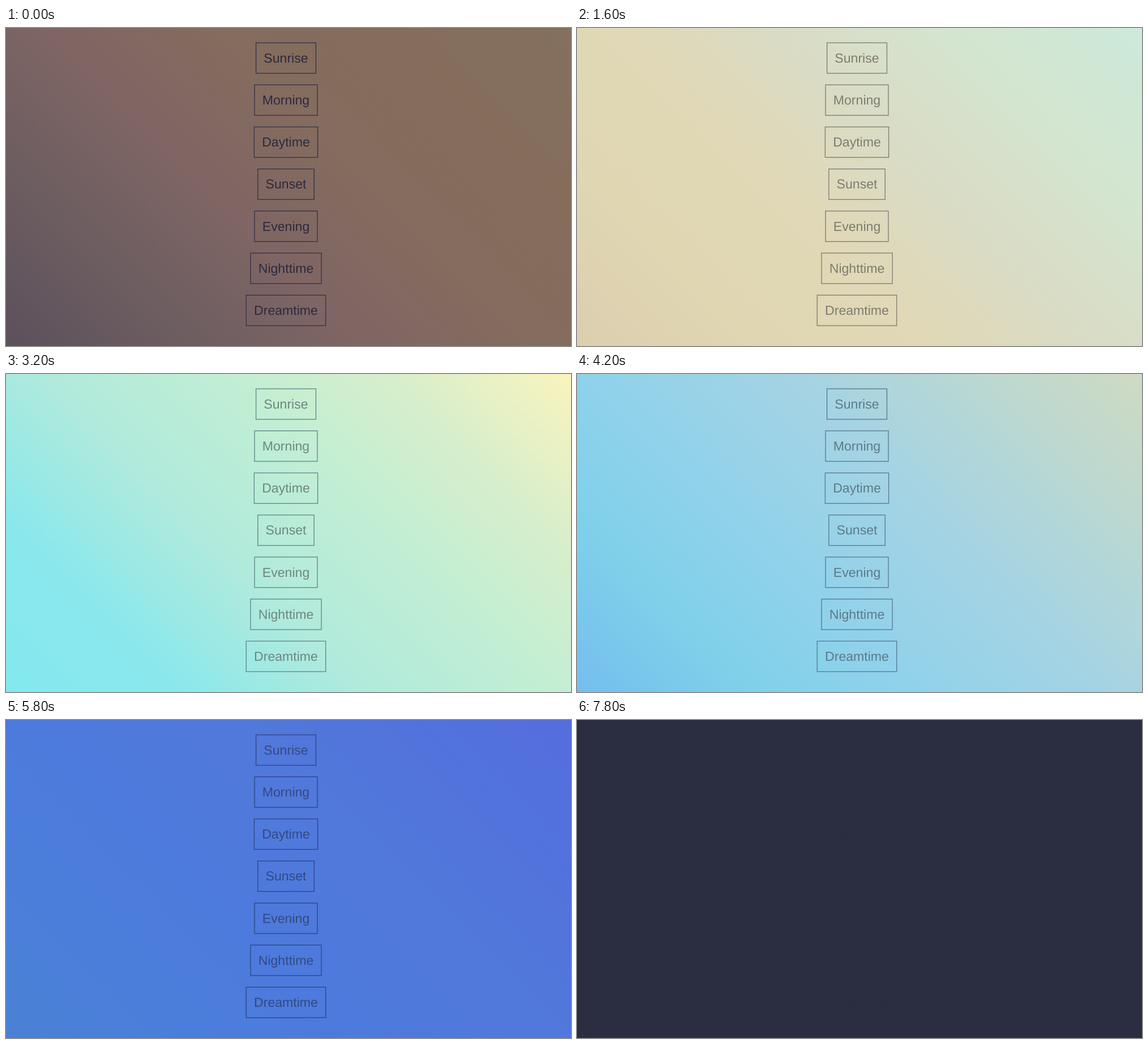
Write an HTML page that moves like this. It is 998 by 561 pixels and loops after 8 s.

```html
<!DOCTYPE html>
<html lang="en">
<head>
<meta charset="utf-8">
<title>Times of day</title>
<style>
  html, body { margin: 0; width: 100%; height: 100%; overflow: hidden; background: #2b2d40; }
  svg { display: block; width: 998px; height: 561px; }
  text { font: 23.1px "Liberation Sans", Arial, sans-serif; text-anchor: middle; text-rendering: geometricPrecision; }
  rect.box { fill: none; stroke-width: 1.3px; }
</style>
</head>
<body>
<svg viewBox="0 0 998 561">
  <defs>
    <linearGradient id="sky" gradientUnits="userSpaceOnUse" x1="109.25" y1="670.25" x2="888.75" y2="-109.25"></linearGradient>
  </defs>
  <rect width="998" height="561" fill="url(#sky)"/>
  <g id="menu"></g>
</svg>
<script>
const LABELS = ["Sunrise", "Morning", "Daytime", "Sunset", "Evening", "Nighttime", "Dreamtime"];
const LOOP = 8000, STEP = 200, MID = 494.5, ROW = 74.2;

// Each key: start of its hold, end of its hold, six sky stops, text colour, border colour
const KEYS = [
  [0, 800, "5c505c 6c5d60 7f6564 846c5e 856d5c 84705e", "2c2a3e", "343248"],
  [1600, 2400, "dcceb0 e0d6b2 e0d8b6 d9dcc6 d3e6d0 cce9da", "7d7c6e", "7c7a72"],
  [3200, 4000, "84e8f0 8ae8ec b0eadc c0eed4 d8eecb faf4bd", "6c8780", "608488"],
  [4200, 4200, "74beee 80d0ea 92d2ea a4d3e4 b9d8d2 d0dac2", "5c7a88", "587690"],
  [4800, 5600, "508ee8 508af4 5486f8 5b86f9 5c7efb 6178ff", "345496", "2e4c94"],
  [6400, 7200, "3d5a96 3a5991 37568b 33527f 32507b 315079", "272d44", "29324c"],
  [7800, 8000, "2b2d40 2b2d40 2b2d40 2b2d40 2b2d40 2b2d40", "2b2d40", "2b2d40"]
].map(([from, to, sky, text, border]) => ({
  from, to, colors: [...sky.split(" "), text, border].map(parse)
}));

function parse(hex) {
  return [0, 2, 4].map(i => parseInt(hex.slice(i, i + 2), 16));
}

function add(parent, name, attrs) {
  const el = document.createElementNS("http://www.w3.org/2000/svg", name);
  for (const key in attrs) el.setAttribute(key, attrs[key]);
  return parent.appendChild(el);
}

const menu = document.getElementById("menu");
const sky = document.getElementById("sky");
const stops = [0, 1, 2, 3, 4, 5].map(i => add(sky, "stop", { offset: i / 5 }));

const boxes = LABELS.map((label, i) => {
  const y = 26.1 + i * ROW;
  const text = add(menu, "text", { x: MID, y: y + 34.6 });
  text.textContent = label;
  const width = text.getComputedTextLength() + 27.5;
  return add(menu, "rect", { class: "box", x: MID - width / 2, y, width, height: 53.8 });
});

function colorsAt(time) {
  let i = KEYS.length - 1;
  while (KEYS[i].from > time) i--;
  const a = KEYS[i], b = KEYS[i + 1];
  const k = b && time > a.to ? (time - a.to) / (b.from - a.to) : 0;
  return a.colors.map((color, n) => {
    const mixed = color.map((v, c) => k ? v + (b.colors[n][c] - v) * k : v);
    return `rgb(${mixed.map(Math.round)})`;
  });
}

function draw(now) {
  // The light changes in visible steps
  const time = Math.floor((now % LOOP) / STEP) * STEP;
  const colors = colorsAt(time);
  stops.forEach((stop, i) => stop.setAttribute("stop-color", colors[i]));
  menu.setAttribute("fill", colors[6]);
  boxes.forEach(box => box.setAttribute("stroke", colors[7]));
}

const start = performance.now();
function tick() {
  draw(performance.now() - start);
  requestAnimationFrame(tick);
}
tick();
</script>
</body>
</html>
```
